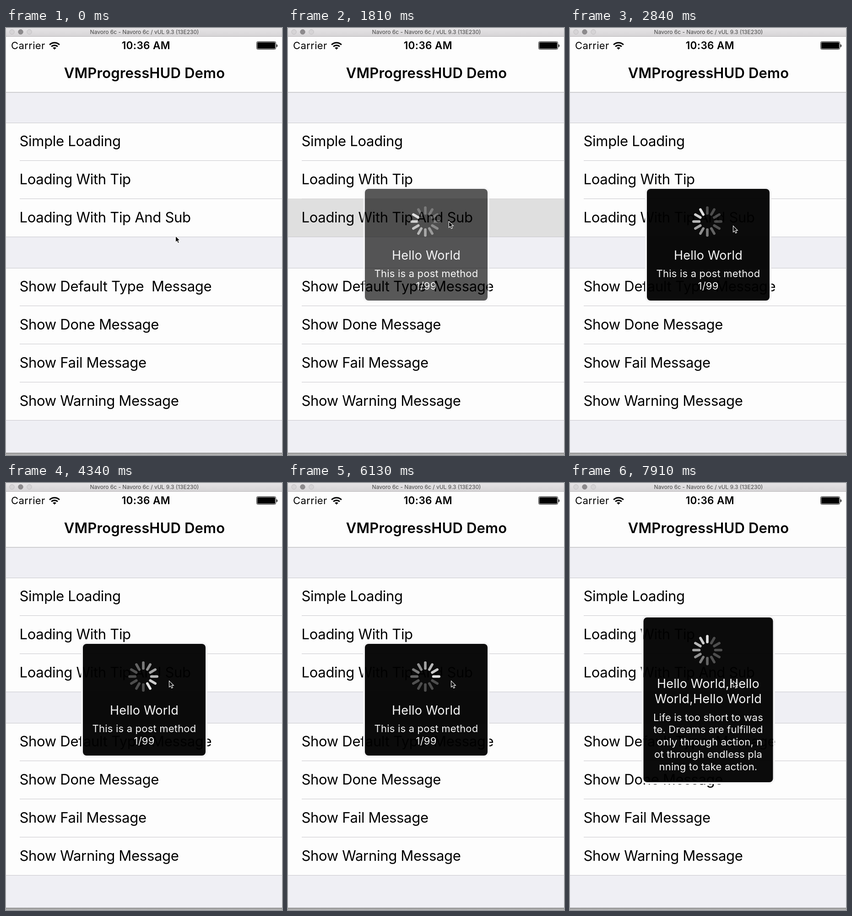
An HTML page for the animation above (8000 ms loop, 603 by 929 pixels).

```html
<!DOCTYPE html>
<html lang="en">
<head>
<meta charset="utf-8">
<title>VMProgressHUD Demo</title>
<style>
html, body { margin: 0; width: 100%; height: 100%; overflow: hidden; background: #efeff4; }
svg { display: block; font-family: Inter, "Open Sans", sans-serif; font-optical-sizing: none; }
text { white-space: pre; }
.mid { text-anchor: middle; }
.bold { font-weight: 600; }
.row { font-size: 31px; letter-spacing: -.3px; }
.tip { font-size: 27px; letter-spacing: .2px; fill: #f7f7f7; }
.sub { font-size: 22px; letter-spacing: .2px; fill: #f7f7f7; }
.line { fill: #c8c7cc; }
</style>
</head>
<body>
<svg id="stage" width="603" height="929" viewBox="0 0 603 929">
  <defs>
    <linearGradient id="bar" x2="0" y2="1"><stop stop-color="#e6e4e6"/><stop offset="1" stop-color="#d6d4d6"/></linearGradient>
    <linearGradient id="edge" x2="0" y2="1"><stop stop-color="#8c8c8c"/><stop offset="1" stop-color="#bcbcbc"/></linearGradient>
  </defs>
  <rect width="603" height="929" fill="#efeff4"/>

  <!-- window bar -->
  <rect width="603" height="18" fill="url(#bar)"/>
  <rect y="18" width="603" height="1" fill="#b9b7b9"/>
  <g fill="#d6d4d6" stroke="#c1bfc1">
    <circle cx="13" cy="8.5" r="5.2"/>
    <circle cx="32" cy="8.5" r="5.2" fill="#8d8b8d" stroke="#858385"/>
    <circle cx="51" cy="8.5" r="5.2"/>
  </g>
  <text class="mid" x="302.5" y="13" font-size="12" fill="#444">Navoro 6c - Navoro 6c / vUL 9.3 (13E230)</text>

  <!-- status and navigation -->
  <rect y="19" width="603" height="121" fill="#fdfdfd"/>
  <rect y="139.5" width="603" height="1" fill="#a9a9ac"/>
  <text x="11" y="46" font-size="22" letter-spacing=".4">Carrier</text>
  <g fill="none" stroke="#000" stroke-width="3">
    <path d="M95.2 36.5A15.3 15.3 0 0 1 116.8 36.5M99.2 40.5A9.6 9.6 0 0 1 112.8 40.5"/>
    <path d="M106 47L102.2 43.2A5.4 5.4 0 0 1 109.8 43.2Z" fill="#000" stroke="none"/>
  </g>
  <text class="mid bold" x="305.8" y="46" font-size="22.5" letter-spacing=".4">10:36 AM</text>
  <rect x="547.5" y="29.5" width="42" height="17" rx="3" fill="none" stroke="#000"/>
  <rect x="549" y="31" width="39" height="14" rx="1.5"/>
  <path d="M591 35a4 4 0 0 1 0 7z"/>
  <text class="mid bold" x="302.5" y="109" font-size="31" letter-spacing=".15">VMProgressHUD Demo</text>

  <g id="list"></g>
  <rect y="924" width="603" height="5" fill="url(#edge)"/>
  <g id="huds"></g>
  <path id="cursor" d="M0 0V13.6L3.1 10.8 5.3 15.7 7.8 14.6 5.6 9.9H9.8Z" stroke="#fff" stroke-width="1.1"/>
</svg>
<script>
const $ = id => document.getElementById(id);
const rect = (x, y, w, h, more) => `<rect x="${x}" y="${y}" width="${w}" height="${h}" ${more}/>`;
const text = (cls, x, y, s) => `<text class="${cls}" x="${x}" y="${y}">${s}</text>`;

// table sections: white block, hairlines, labels
const section = (top, labels) => {
  const h = labels.length * 83 - 1;
  return rect(0, top, 603, h, 'fill="#fdfdfd"')
    + rect(0, top, 603, 1, 'class="line"') + rect(0, top + h, 603, 1, 'class="line"')
    + labels.map((s, i) => (i ? rect(30, top + i * 83 - 1, 573, 1, 'class="line"') : '')
      + (s.endsWith('Sub') ? rect(0, top + i * 83 - 1, 603, 83, 'id="press" fill="#d9d9d9"') : '')
      + text('row', 29.5, top + 51 + i * 83, s)).join('');
};
$('list').innerHTML =
  section(206, ['Simple Loading', 'Loading With Tip', 'Loading With Tip And Sub'])
  + section(522, ['Show Default Type  Message', 'Show Done Message', 'Show Fail Message', 'Show Warning Message']);

const hud = (x, y, w, h, tips, subs) => {
  const spokes = Array.from({ length: 12 }, (_, i) =>
    `<path class="spoke" d="M0 -17.5V-30.2" transform="rotate(${i * 30})"/>`).join('');
  const tipY = y + 153.5, subY = tipY + (tips.length - 1) * 33 + 38.5;
  return `<g>${rect(x - 2, y - 2, w + 4, h + 4, 'rx="10" fill="none" stroke="#f5f5f6" stroke-width="4"')}`
    + rect(x, y, w, h, 'rx="8" fill-opacity=".955"')
    + `<g transform="translate(300 ${y + 71})" stroke="#fff" stroke-width="5.6" stroke-linecap="round">${spokes}</g>`
    + tips.map((s, i) => text('tip mid', 302, tipY + i * 33, s)).join('')
    + subs.map((s, i) => text('sub mid', 302, subY + i * 26.9, s)).join('') + '</g>';
};
$('huds').innerHTML =
  hud(168, 350, 268, 243, ['Hello World'], ['This is a post method', '1/99'])
  + hud(160.5, 292.5, 283, 358.5, ['Hello World,Hello', 'World,Hello World'],
    ['Life is too short to was', 'te. Dreams are fulfilled', ' only through action, n', 'ot through endless pla', 'nning to take action.']);

const [first, second] = $('huds').children;
const spokes = [...document.querySelectorAll('.spoke')];
const clamp = v => Math.min(1, Math.max(0, v));

// pointer stops: step, x, y
const stops = [[-99, 370.5, 452.5], [-8, 361, 436], [-6, 356, 424], [-5, 351, 408], [-4, 346.5, 394],
  [-3, 349, 411], [-2, 351.5, 420.5], [3, 354, 426], [4, 356.5, 430.5]];

function draw(now) {
  const n = Math.floor((now % 8000 - 1495) / 148.6);
  const [, x, y] = stops.findLast(s => n >= s[0]);
  $('cursor').setAttribute('transform', `translate(${x} ${y})`);
  $('press').setAttribute('opacity', n < 0 ? 0 : clamp(1 - (n - 1.55) * .45));
  first.setAttribute('opacity', n < 34 ? clamp((n - .64) / 2) : 0);
  second.setAttribute('opacity', n < 34 ? 0 : 1);
  const head = Math.floor(7 + 1.81 * n);
  spokes.forEach((s, i) => {
    const age = ((head - i) % 12 + 12) % 12;
    s.setAttribute('stroke-opacity', Math.max(.27, .88 - age * .085));
  });
}
const t0 = performance.now();
(function loop() {
  draw(performance.now() - t0);
  requestAnimationFrame(loop);
})();
</script>
</body>
</html>
```
